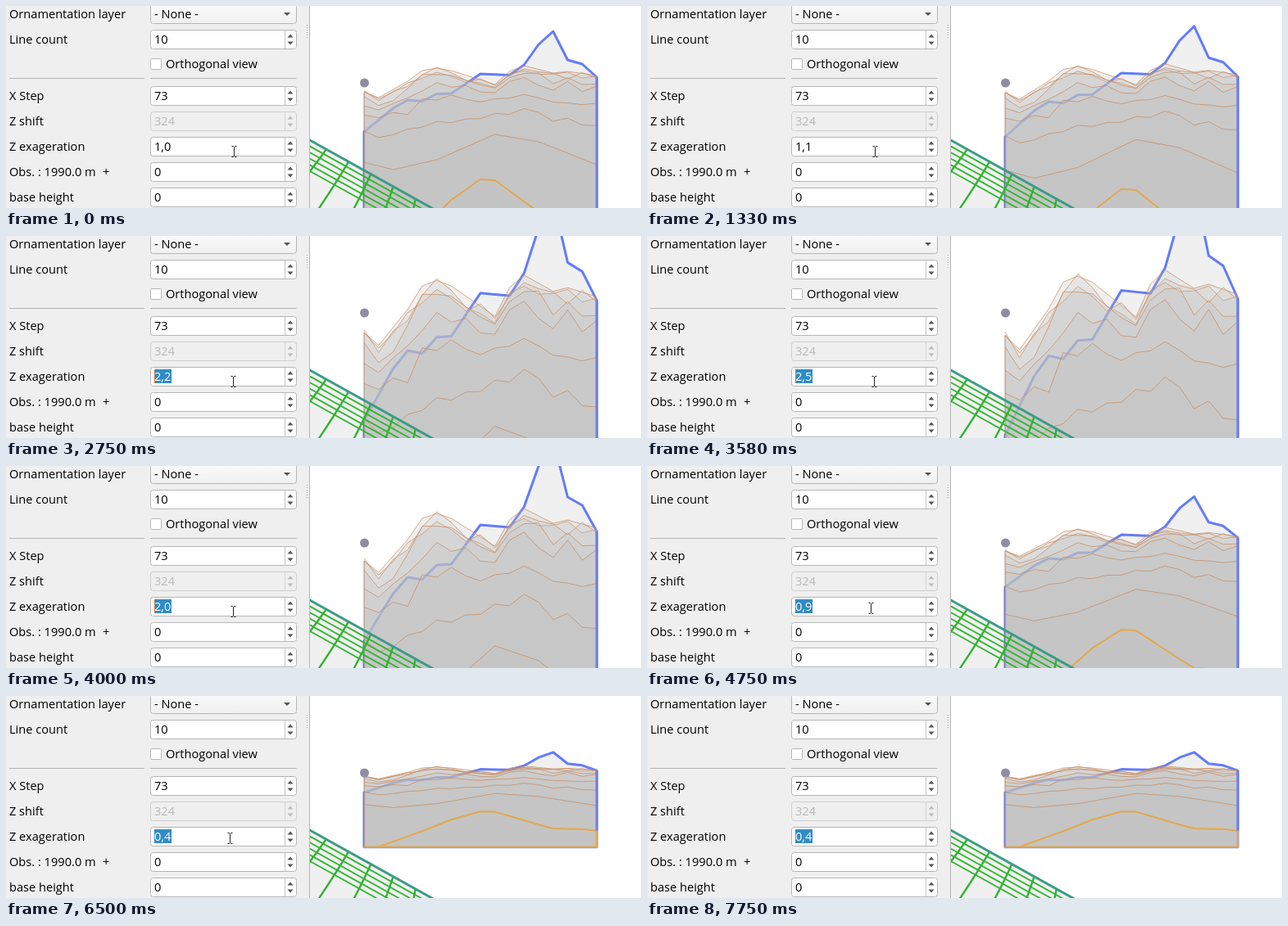
These frames come from a looping animation (775 px wide and 247 px high, 8 s). An HTML page with a canvas:

```html
<!DOCTYPE html>
<html lang="en">
<head>
<meta charset="utf-8">
<title>Profile exaggeration</title>
<style>
  html, body { margin: 0; width: 775px; height: 247px; overflow: hidden; background: #fff; }
  canvas, svg { position: absolute; left: 0; top: 0; display: block; }
  text { font: 14.6px "Open Sans", "Noto Sans", sans-serif; fill: #000; white-space: pre; }
  .off { fill: #b9b9b9; }
  .box { fill: #fff; stroke: #b6b6b6; }
  .rule { stroke: #b4b4b4; }
</style>
</head>
<body>
<canvas id="plot" width="775" height="247"></canvas>
<svg id="panel" width="775" height="247" viewBox="0 0 775 247">
  <defs>
    <linearGradient id="button" x2="0" y2="1">
      <stop stop-color="#fafafa"/><stop offset="1" stop-color="#f0f0f0"/>
    </linearGradient>
  </defs>
  <rect width="371" height="247" fill="#efefef"/>
  <path class="rule" d="M370.5 0V247M4 88.5H169M176 88.5H354.5"/>
  <path d="M367.5 23V39" stroke="#aaa" stroke-dasharray="1 2"/>
  <rect class="box" x="176.500" y="-2.500" width="178" height="24" rx="3" style="fill:url(#button)"/>
  <path d="M339 8h8l-4 4z" fill="#555"/>
  <rect class="box" x="176.500" y="64.500" width="13" height="13" rx="1"/>
  <text x="4" y="15">Ornamentation layer</text>
  <text x="181" y="15">- None -</text>
  <text x="195" y="76">Orthogonal view</text>
  <text x="118" y="208">+</text>
  <g id="rows"></g>
  <rect id="mark" x="181" y="163" width="21" height="17" fill="#308cc6"/>
  <text id="value" x="181" y="177"></text>
  <path id="caret" d="M181.500 163v17" stroke="#cf7339"/>
  <path id="pointer" fill="none" stroke="#222"
    d="M-3 -6.500H-1L0 -5.500L1 -6.500H3M0 -5.500V5.500M-3 6.500H-1L0 5.500L1 6.500H3"/>
</svg>
<script>
const $ = id => document.getElementById(id);
const ctx = $('plot').getContext('2d');
const LOOP = 8000, LEFT = 437, RIGHT = 721, HORIZON = 94, BASE = 227;
const SEGMENTS = 16, RIDGES = 8;

// Panel rows: label, value, centre y
const rows = [
  ['Line count', '10', 41], ['X Step', '73', 110], ['Z shift', '324', 141],
  ['Z exageration', '', 172], ['Obs. : 1990.0 m', '0', 203], ['base height', '0', 234]
];
$('rows').innerHTML = rows.map(([label, value, y]) => {
  const off = label === 'Z shift';
  const ink = off ? '#bbb' : '#555';
  return `<text x="4" y="${y + 5}">${label}</text>
    <rect class="box" x="176.500" y="${y - 11.5}" width="178" height="23" rx="3"
      ${off ? 'style="fill:#efefef;stroke:#cfcfcf"' : ''}/>
    <path d="M340.500 ${y - 11}v22" stroke="${off ? '#d5d5d5' : '#c4c4c4'}"/>
    <path d="M343.500 ${y - 2.5}h7l-3.500 -4zM343.500 ${y + 2.5}h7l-3.500 4z" fill="${ink}"/>
    <text x="181" y="${y + 5}" class="${off ? 'off' : ''}">${value}</text>`;
}).join('');

// Spreads [position, depth] key points over every segment of a profile
function profileFrom(keys) {
  return Array.from({ length: SEGMENTS + 1 }, (_, i) => {
    const n = Math.max(1, keys.findIndex(k => k[0] >= i));
    const [x0, d0] = keys[n - 1], [x1, d1] = keys[n];
    return d0 + (d1 - d0) * (i - x0) / (x1 - x0);
  });
}

let seed = 7;
const random = () => (seed = seed * 16807 % 2147483647) / 2147483647;

// Depths below the horizon at exaggeration 1
const far = profileFrom([[0, 60], [2, 31], [3, 21], [4, 22.5], [5, 13.5], [6, 13], [8, -11],
  [10, -9.5], [11, -22], [12, -47], [13, -63], [14, -28], [15, -23], [16, -7]]);
const near = profileFrom([[0, 227], [1, 226], [4, 178], [6, 143], [8, 118], [9, 119],
  [12, 158], [13, 170], [15, 172], [16, 177]]);
const crest = profileFrom([[0, 11], [1, 18], [3, -2], [4, -15], [5, -18], [6, -15], [9, 2],
  [10, -14], [11, -21], [13, -12], [14, -14], [16, -9]]);
const foot = profileFrom([[0, 97], [2, 106], [5, 94], [9, 63], [12, 72], [16, 100]]);

// Ridges sink from crest to foot, roughest in between
const ridges = Array.from({ length: RIDGES }, (_, k) => {
  const u = k / (RIDGES - 1);
  const rough = 26 * Math.sqrt(u * (1 - u));
  return crest.map((d, i) => d + (foot[i] - d) * u ** 3.5 + rough * (random() - .25));
});

// Runs of value changes: tick, first value, count, increment
const runs = [
  [0, 1], [16, 1.1], [19, 1.2, 6, .1], [27, 1.8], [31, 2, 7, .1], [43, 2.5, 9, -.1],
  [53, 1.5, 5, -.15], [60, .7], [62, .5], [64, .3], [68, .2], [75, .3], [78, .4]
];
const tickAt = t => Math.floor(t * .012 + .05);

function exaggeration(tick) {
  const [from, first, count = 1, add = 0] = runs.findLast(r => r[0] <= tick);
  return Math.round((first + add * Math.min(tick - from, count - 1)) * 10) / 10;
}

function pointerAt(tick) {
  if (tick >= 93) return [-20, -20];
  if (tick >= 91) return [266.5 - 14 * (tick - 91), 200 + 32 * (tick - 91)];
  return tick < 17 ? [278.5, 178] : tick < 53 ? [277.5, 178] : [273.5, 174];
}

function outline(depths, z) {
  ctx.beginPath();
  depths.forEach((d, i) => ctx.lineTo(LEFT + (RIGHT - LEFT) * i / SEGMENTS, HORIZON + d * z));
}

function line(color, width, ...pts) {
  ctx.beginPath();
  for (let i = 0; i < pts.length; i += 2) ctx.lineTo(pts[i], pts[i + 1]);
  ctx.strokeStyle = color;
  ctx.lineWidth = width;
  ctx.stroke();
}

function profile(depths, z, color, width, closed) {
  const bottom = HORIZON + BASE * z;
  outline(depths, z);
  ctx.lineTo(RIGHT, bottom);
  ctx.lineTo(LEFT, bottom);
  ctx.closePath();
  ctx.fillStyle = 'rgba(190,190,190,.23)';
  ctx.fill();
  if (!closed) outline(depths, z);
  ctx.strokeStyle = color;
  ctx.lineWidth = width;
  ctx.stroke();
}

function grid() {
  const green = '#2fb52f', slope = 83 / 149;
  for (let k = 1; k < 6; k++) {
    const y = 164 + 7.6 * k;
    line(green, 1.8, 371, y, 371 + (250 - y) / slope, 250);
  }
  // Cross lines steepen towards the right
  for (let k = 0; k < 5; k++) {
    const x = 391 + 27.2 * k, y = 175 + 15.2 * k, run = 55 - 10 * k;
    ctx.beginPath();
    ctx.moveTo(x, y);
    ctx.quadraticCurveTo(x - run * .4, y + 31, x - run, y + 72 - 2 * k);
    ctx.strokeStyle = green;
    ctx.lineWidth = 2.4;
    ctx.stroke();
  }
  line('#3c9c86', 3, 369, 163, 525, 250);
}

function draw(z) {
  ctx.fillStyle = '#fff';
  ctx.fillRect(0, 0, 775, 247);
  ctx.beginPath();
  ctx.moveTo(371, 164);
  ctx.lineTo(520, 247);
  ctx.lineTo(371, 247);
  ctx.fillStyle = '#f0f0f0';
  ctx.fill();
  ctx.lineJoin = 'round';

  const y = d => HORIZON + d * z;
  profile(far, z, '#637cfa', 3, true);
  ridges.forEach(r => profile(r, z, 'rgba(200,137,91,.7)', 1));
  profile(near, z, '#e2a84c', 2, true);
  line('rgba(165,120,100,.55)', 1.5, LEFT, y(crest[0]), LEFT, y(BASE));
  line('rgba(99,120,240,.8)', 3, RIGHT, y(far[SEGMENTS]), RIGHT, y(near[SEGMENTS]));
  grid();

  ctx.beginPath();
  ctx.arc(437.5, 94, 5.5, 0, 7);
  ctx.fillStyle = '#8f8da1';
  ctx.fill();
}

const show = (id, on) => $(id).style.display = on ? '' : 'none';
const start = performance.now();

function frame() {
  const tick = tickAt((performance.now() - start) % LOOP);
  const z = exaggeration(tick);
  const selected = tick >= 17;
  draw(z);
  $('value').textContent = z.toFixed(1).replace('.', ',');
  $('value').style.fill = selected ? '#fff' : '';
  show('mark', selected);
  show('caret', tick >= 31 && tick < 53);
  $('pointer').setAttribute('transform', `translate(${pointerAt(tick)})`);
  requestAnimationFrame(frame);
}
frame();
</script>
</body>
</html>
```
